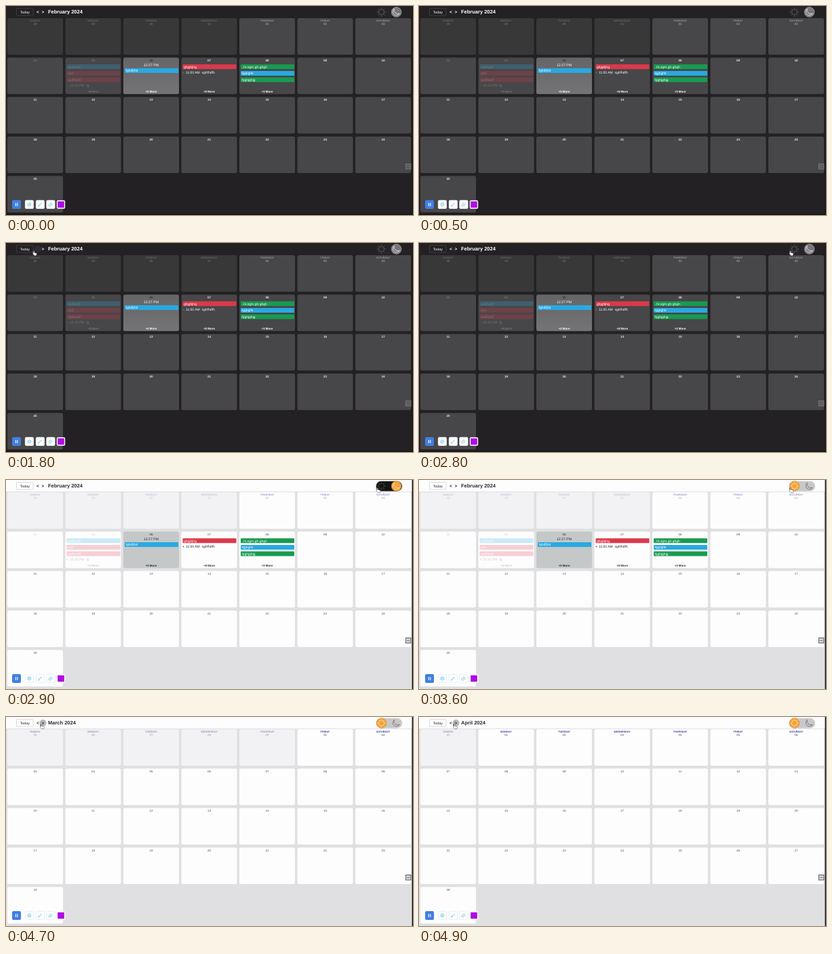
An HTML page for the animation above (5000 ms loop, 600 by 309 pixels).

```html
<!DOCTYPE html>
<html lang="en">
<head>
<meta charset="utf-8">
<title>Calendar</title>
<style>
html, body { margin: 0; width: 100%; height: 100%; overflow: hidden; }
svg { display: block; width: 600px; height: 309px; text-rendering: geometricPrecision;
  font-family: "Liberation Sans", Arial, sans-serif;
  --page: #232123; --head: #232123; --cell: #474648; --other: #393839; --today: url(#glow);
  --ink: #fff; --num: #e4e4e4; --day: #e4e4e4; --weight: 700; --line: #444246;
  --hover: #302e32; --hoverInk: #302e32; --dim: .25; --tool: #fff; --toolLine: #fff;
  --edge: #151416; --grip: #77767a; --gripFill: #5b5a5d; }
svg.light { --page: #e0dfe1; --head: #fdfdfe; --cell: #fefdfe; --other: #f2f1f3; --today: #c4c8c9;
  --ink: #2b2b2e; --num: #55555a; --day: #333a9c; --weight: 400; --line: #d3d2d6;
  --hover: #b9b8bb; --hoverInk: #55555a; --dim: .23; --tool: #fefefe; --toolLine: #d9eef8;
  --edge: #e0dfe1; --grip: #5e5d66; --gripFill: #d5d4da; }
.ink { fill: var(--ink); }
.num { fill: var(--num); font-weight: var(--weight); }
.day { fill: var(--day); font-weight: 700; }
.b { font-weight: 700; }
</style>
</head>
<body>
<svg id="stage" viewBox="0 0 600 309">
  <defs>
    <linearGradient id="glow" x2="0" y2="1">
      <stop stop-color="#656466"/><stop offset="1" stop-color="#747375"/>
    </linearGradient>
  </defs>
  <g id="view"></g>
  <g id="toggle"></g>
  <path id="hand" d="M0 0.4Q.8-.5 1.4.6L1.6 2.8 4.5 3.5Q5.2 4 4.8 5.2L4.2 7.2H1.2L-1 4.4Q-1-3.4.2 3.4Z"
    fill="#fff" stroke="#222" stroke-width=".45"/>
</svg>
<script>
const $ = id => document.getElementById(id);
const stage = $('stage'), view = $('view'), toggle = $('toggle'), hand = $('hand');
const DAYS = ['SUNDAY', 'MONDAY', 'TUESDAY', 'WEDNESDAY', 'THURSDAY', 'FRIDAY', 'SATURDAY'];
// Month: title, first date shown, days of the previous month, length of that month
const MONTHS = [['February 2024', 28, 4, 31], ['March 2024', 25, 5, 29], ['April 2024', 31, 1, 31]];
const BLUE = '#29a9e1', RED = '#dc394b', GREEN = '#189b50';
const EVENTS = {
  5: { bars: [[BLUE, 'asdfasdf'], [RED, 'asd'], [RED, 'asdfasdf']], timed: '12:33 PM  fg', more: 8 },
  6: { bars: [[BLUE, 'fghdfjhd']], more: 0 },
  7: { bars: [[RED, 'ghjghjhg']], timed: '11:00 AM  sghfhdfh', more: 0 },
  8: { bars: [[GREEN, '..hi,ngm,gh,ghgh'], [BLUE, 'kjgkghk'], [GREEN, 'hjghjghjg']], more: 3 }
};
// Pointer path: time, x, y
const PATH = [[600, 240, 150], [1000, 181, 100.5], [1200, 181, 100.5], [1700, 40.5, 11.5], [2200, 40.5, 11.5],
  [2700, 547, 11.5], [3700, 547, 11.5], [4300, 51.5, 10.5], [5000, 51.5, 10.5]];

const rect = (x, y, w, h, fill, rest = '') =>
  `<rect x="${x}" y="${y}" width="${w}" height="${h}" fill="${fill}" ${rest}/>`;
const circle = (x, y, r, fill, rest = '') => `<circle cx="${x}" cy="${y}" r="${r}" fill="${fill}" ${rest}/>`;
const text = (x, y, size, str, cls = 'ink', anchor = 'middle', rest = '') =>
  `<text x="${x}" y="${y}" font-size="${size}" class="${cls}" text-anchor="${anchor}" xml:space="preserve" ${rest}>${str}</text>`;
const stroke = (d, color, w) =>
  `<path d="${d}" fill="none" stroke="${color}" stroke-width="${w}" stroke-linecap="round"/>`;
const pad = n => String(n).padStart(2, '0');

function events(day, x, y) {
  const ev = EVENTS[day], top = y + (day === 6 ? 15.6 : 10);
  let s = '';
  ev.bars.forEach(([color, label], i) => {
    const by = top + i * 9.6;
    s += rect(x + 2, by, 79, 7, color, 'rx="1"') +
      text(x + 3.5, by + 5.2, 5, label, '', 'start', 'fill="#fff"');
  });
  if (ev.timed) {
    const ty = top + ev.bars.length * 9.6 + 4.2;
    s += circle(x + 3, ty - 1.7, 1, day === 7 ? GREEN : '#777') + text(x + 6.5, ty, 5, ev.timed, 'ink', 'start');
  }
  return s + text(x + 41, y + 51.2, 4.4, `+${ev.more} More`, 'ink b');
}

function cells(m, plus) {
  const [, first, lead, length] = MONTHS[m];
  let s = '';
  for (let i = 0; i < 29; i++) {
    const col = i % 7, row = Math.floor(i / 7);
    const x = 2 + col * 85.5, y = 18 + row * 58.3, mid = x + 41;
    const other = i < lead, day = other ? (first + i - 1) % length + 1 : i - lead + 1;
    const past = m === 0 && !other && day < 6, today = m === 0 && !other && day === 6;
    const faint = m ? (other ? .5 : 1) : other || (past && row) ? 'var(--dim)' : past ? .5 : 1;
    s += rect(x, y, 82, 54, `var(--${other ? 'other' : today ? 'today' : 'cell'})`, 'rx="2.5"');
    s += `<g style="opacity:${faint}">`;
    if (!row) s += text(mid, y + 5, 3.8, DAYS[col], 'day');
    s += text(mid, y + (row ? 5.7 : 10), 4.6, pad(day), 'num', 'middle', today ? 'style="fill:#38373a"' : '');
    if (today) s += text(mid, y + 12.6, 5.2, '12:27 PM');
    if (m === 0 && !other && EVENTS[day]) s += events(day, x, y);
    s += '</g>';
    if (today && plus) s += text(x + 76.5, y + 6, 5.5, '+', 'ink b');
  }
  return s;
}

function tools() {
  const c = '#58b9dc';
  let s = rect(9, 287, 13, 13, '#3f7fe4', 'rx="2"') + stroke('M14.3 291.6v3.8M16.8 291.6v3.8', '#fff', 1.1);
  for (const x of [28, 44, 59.5])
    s += rect(x + .3, 287.3, 12.2, 12.2, 'var(--tool)', 'rx="1.5" stroke="var(--toolLine)" stroke-width=".7"');
  s += circle(34.3, 293.4, 2.4, 'none', `stroke="${c}" stroke-width=".8"`) + circle(34.3, 293.4, .8, c);
  s += stroke('M48 295.6l4.2-4.2M47.7 295.9l1-.2', c, 1);
  s += stroke('M63 294l3-3 2.3 2-3 3h-1.2zM64.5 292.6l2.2 2', c, .7);
  return s + rect(75.5, 288, 11, 11, '#ae0de0', 'rx="1" stroke="var(--tool)" stroke-width="1.3"');
}

function draw(m, hover, plus) {
  const over = side => hover === side ? 'style="fill:var(--hoverInk)"' : '';
  view.innerHTML = rect(0, 0, 600, 309, 'var(--page)') + rect(0, 0, 600, 17, 'var(--head)') +
    rect(15.5, 3.5, 24.5, 10.5, 'none', 'rx=".5" stroke="var(--line)" stroke-width=".8"') +
    text(27.8, 10.8, 5.3, 'Today') +
    (hover ? circle(hover === 'prev' ? 47 : 54.5, 8.7, 5, 'var(--hover)') : '') +
    text(47, 10.9, 6.5, '&lt;', 'ink b', 'middle', over('prev')) +
    text(54.3, 10.9, 6.5, '&gt;', 'ink b') +
    text(62, 11.4, 7.5, MONTHS[m][0], 'ink b', 'start') +
    cells(m, plus) + rect(0, 307.5, 600, 1.5, 'var(--edge)') + rect(598.5, 0, 1.5, 309, '#19181a') +
    rect(589.3, 233.5, 7.5, 7.5, 'var(--gripFill)', 'stroke="var(--grip)"') +
    stroke('M591.3 237.3h3.5', 'var(--grip)', .8) + tools();
}

const sun = color => {
  let d = '';
  for (let i = 0; i < 8; i++) {
    const a = i * Math.PI / 4, c = Math.cos(a), s = Math.sin(a);
    d += `M${553.5 + 5 * c} ${9 + 5 * s}l${1.2 * c} ${1.2 * s}`;
  }
  return circle(553.5, 9, 4, 'none', `stroke="${color}" stroke-width=".9"`) + stroke(d, color, .9);
};
const moon = color => stroke('M572 4.5A5.4 5.4 0 1 0 580.3 11.2A6 6 0 0 1 572 4.5Z', color, .9);

function drawToggle(light, p) {
  const g = Math.round(20 + 180 * p);
  const pill = light ? `rgb(${g},${g},${g})` : '#272528';
  toggle.innerHTML = rect(545.5, 1.8, 38.5, 14.6, pill, 'rx="7.3"') +
    circle(light ? 575.5 - 22 * p : 575.5, 9, 7.3, light ? '#f1a33d' : '#77767a',
      `stroke="${light ? '#d9913a' : '#aaa9ad'}" stroke-width=".8"`) +
    sun(light ? (p < 1 ? '#47413c' : '#ffd98c') : '#59585b') +
    moon(light ? (p < .5 ? '#ffd98c' : '#747378') : '#e4e4e6');
}

function pointer(t) {
  const i = PATH.findIndex(k => k[0] > t);
  hand.style.display = i > 0 ? '' : 'none';
  if (i < 1) return;
  const [t0, x0, y0] = PATH[i - 1], [t1, x1, y1] = PATH[i];
  const u = (t - t0) / (t1 - t0), e = u * u * (3 - 2 * u);
  hand.setAttribute('transform', `translate(${x0 + (x1 - x0) * e} ${y0 + (y1 - y0) * e})`);
}

let shown = -1;
function tick(now) {
  const t = Math.floor(now % 5000 / 100) * 100;
  if (t !== shown) {
    shown = t;
    const light = t >= 2900;
    stage.classList.toggle('light', light);
    draw(t < 4600 ? 0 : t < 4800 ? 1 : 2,
      t >= 1700 && t < 2300 ? 'prev' : t >= 4300 ? 'next' : '', t >= 900 && t < 1400);
    drawToggle(light, Math.min(1, Math.max(0, (t - 2900) / 300)));
    pointer(t);
  }
  requestAnimationFrame(tick);
}
requestAnimationFrame(tick);
</script>
</body>
</html>
```
